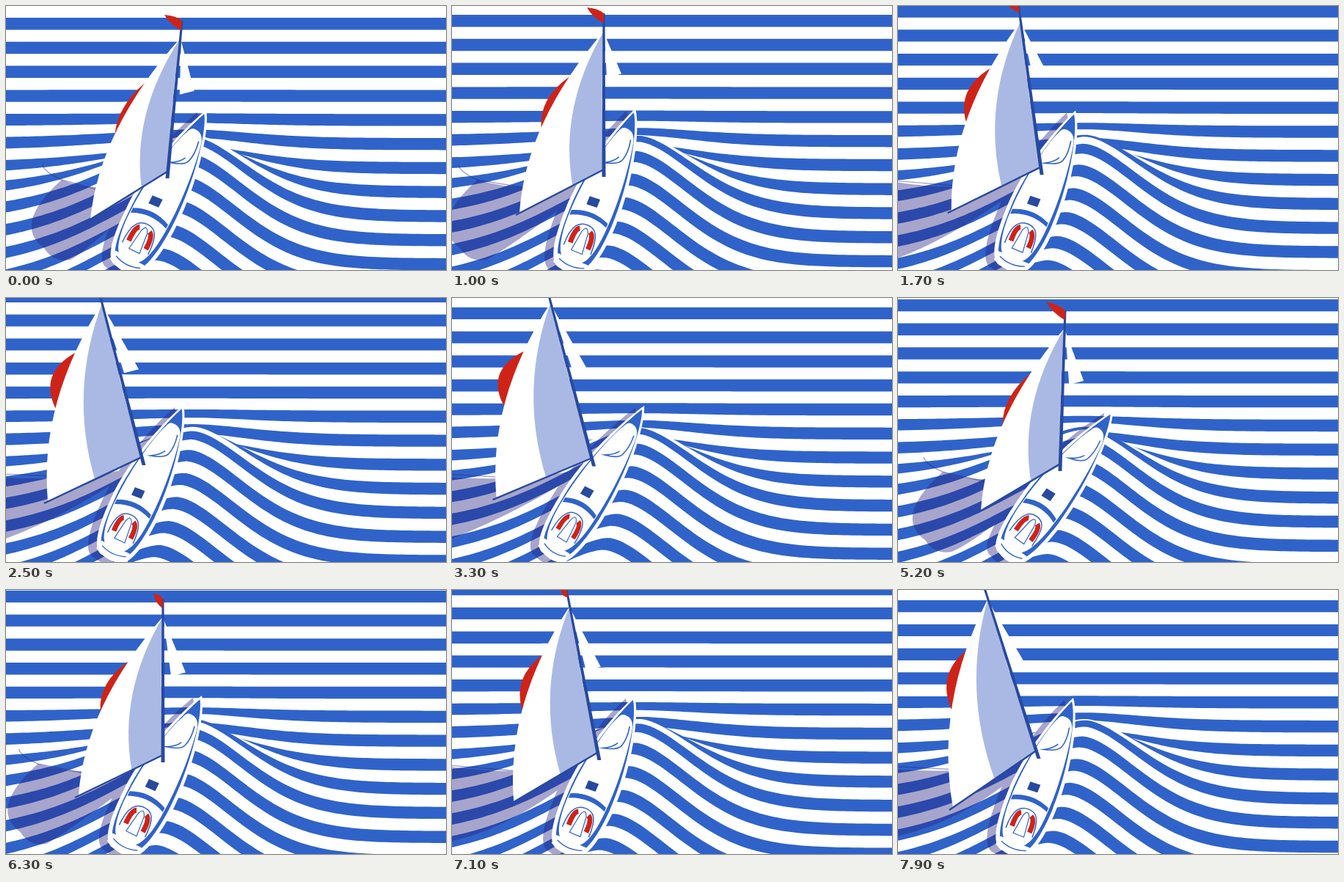
Animation, 600 px wide and 360 px high, one loop 8000 ms. Source, as an HTML page with a canvas:

```html
<!DOCTYPE html>
<html lang="en">
<head>
<meta charset="utf-8">
<title>Sailing over striped waves</title>
<style>
  html, body { margin: 0; width: 100%; height: 100%; overflow: hidden; background: #fff; }
  canvas { display: block; width: 100vw; height: 100vh; }
</style>
</head>
<body>
<canvas id="stage" width="600" height="360"></canvas>
<script>
const ctx = document.getElementById('stage').getContext('2d');
const W = 600, H = 360, LOOP = 8000, STEP = 100;
const BLUE = '#3063c9', NAVY = '#274a9f', RED = '#cf2318', LILAC = '#aab9e4';
const SHADE = 'rgba(36,30,125,0.4)';
const HULL_LENGTH = 242;

// time, bow x y, heading, length, beam, mast foot x y, mast top x y,
// pennant dx dy, clew x y, fold position, red bulge, jib dx dy
const POSES = [
  [0,    273, 142, 26.8, 245, 1,    220, 235, 240, 20,  -24, -8, 115, 291, .66, 6,  19, 72],
  [1000, 250, 140, 22,   240, 1,    207, 233, 207, 10,  -23, -8, 92,  282, .63, 9,  24, 58],
  [2500, 242, 146, 25,   232, .97,  188, 228, 124, -20, -12, 5,  57,  277, .5,  16, 50, 90],
  [4000, 282, 148, 36.5, 253, .9,   203, 232, 150, -15, -15, 0,  73,  271, .56, 17, 48, 93],
  [5200, 293, 154, 35.5, 248, .95,  221, 236, 228, 17,  -26, -12, 113, 290, .63, 7,  26, 72],
  [6300, 267, 144, 26.8, 240, 1,    214, 235, 214, 12,  -13, -7, 99,  280, .63, 9,  31, 76],
  [7900, 239, 147, 21.5, 229, .98,  192, 230, 114, -15, -5,  12, 75,  297, .5,  13, 50, 87]
];

// Smooth interpolation through the poses, at rest at both ends
function slope(i, c) {
  const a = POSES[i - 1], b = POSES[i + 1];
  return a && b ? (b[c] - a[c]) / (b[0] - a[0]) : 0;
}

function poseAt(t) {
  let i = 0;
  while (i < POSES.length - 2 && t > POSES[i + 1][0]) i++;
  const a = POSES[i], b = POSES[i + 1], d = b[0] - a[0], u = (t - a[0]) / d;
  const u2 = u * u, u3 = u2 * u;
  const v = a.map((p, c) =>
    (2 * u3 - 3 * u2 + 1) * p + (u3 - 2 * u2 + u) * d * slope(i, c) +
    (3 * u2 - 2 * u3) * b[c] + (u3 - u2) * d * slope(i + 1, c));
  return {
    bow: [v[1], v[2]], heading: v[3] * Math.PI / 180, len: v[4] / HULL_LENGTH, beam: v[5],
    foot: [v[6], v[7]], top: [v[8], v[9]], pennant: [v[10], v[11]],
    clew: [v[12], v[13]], fold: v[14], bulge: v[15], jib: [v[16], v[17]]
  };
}

const mix = (a, b, u) => [a[0] + (b[0] - a[0]) * u, a[1] + (b[1] - a[1]) * u];
const add = (a, x, y) => [a[0] + x, a[1] + y];
const quad = (a, c, b, u) => mix(mix(a, c, u), mix(c, b, u), u);

function fill(path, color) {
  ctx.fillStyle = color;
  ctx.fill(path);
}

function stroke(path, color, width) {
  ctx.strokeStyle = color;
  ctx.lineWidth = width;
  ctx.stroke(path);
}

// Sea: s is the undisturbed height of a stripe edge
function swell(s) {
  return 112 / (1 + Math.exp((240 - s) / 18)) + 9 * Math.exp(-(((s - 188) / 22) ** 2));
}

function seaY(x, s, height, ridge) {
  const d = x - ridge;
  const fall = d < 0 ? (-d / 160) ** 1.6 : (d / 112) ** 1.7;
  return s - height * Math.exp(-fall);
}

function drawSea(t) {
  const period = 32.8;
  const first = (16 + 28.8 * t / 1000) % period - period;
  ctx.fillStyle = '#fff';
  ctx.fillRect(0, 0, W, H);
  for (let k = 0; k < 36; k++) {
    const s = first + k * period / 2;
    const height = swell(s);
    const ridge = 255 - 30 * (Math.max(0, s - 275) / 130) ** 1.5;
    const p = new Path2D();
    p.moveTo(0, H + 200);
    for (let x = 0; x <= W; x += 6) p.lineTo(x, seaY(x, s, height, ridge));
    p.lineTo(W, H + 200);
    fill(p, k % 2 ? '#fff' : BLUE);
  }
}

const hull = new Path2D('M0 0C-12 25-38 100-37 165C-37 200-33 242-14 242Q0 246 12 242C28 238 34 200 35 165C36 95 16 20 0 0Z');
const deck = new Path2D('M-4 30C8 28 14 36 16 50C24 90 27 140 25 170C24 200 18 222 8 226L-16 226C-26 222-31 190-30 165C-30 120-20 60-10 38Q-8 31-4 30Z');
const cabin = new Path2D('M10 42Q14 60 10 72Q7 80-12 85Q0 78 4 70');
const hatch = new Path2D('M-13 135L2 134L2 146L-13 147Z');
const bridge = new Path2D('M-29 162Q-3 149 24 161L24 167Q-3 156-29 169Z');
const cockpit = new Path2D('M-21 210C-22 180-12 173-1 173C11 173 18 180 18 209');
const seats = new Path2D('M-14 204Q-15 184-9 181M12 204Q13 184 6 181');
const well = new Path2D('M-5 184Q-1 172 4 184L7 213L-9 213Z');
const transom = new Path2D('M-20 230Q-2 238 17 230');

function hullMatrix(p) {
  return new DOMMatrix().translateSelf(...p.bow)
    .rotateSelf(p.heading * 180 / Math.PI).scaleSelf(p.beam, p.len);
}

function drawHull(p) {
  ctx.save();
  ctx.translate(...p.bow);
  ctx.rotate(p.heading);
  ctx.scale(p.beam, p.len);
  fill(hull, '#fff');
  ctx.save();
  ctx.translate(0, 116);
  ctx.scale(.86, .95);
  ctx.translate(0, -116);
  fill(hull, BLUE);
  ctx.restore();
  fill(deck, '#fff');
  const stern = new Path2D('M-24 224L20 224L22 236Q0 250-26 237Z');
  fill(stern, '#fff');
  stroke(cabin, BLUE, 1.6);
  fill(hatch, NAVY);
  fill(bridge, BLUE);
  stroke(cockpit, BLUE, 1.5);
  ctx.lineCap = 'butt';
  stroke(seats, RED, 7);
  fill(well, '#fff');
  stroke(well, BLUE, 1.2);
  stroke(transom, BLUE, 1.4);
  ctx.restore();
}

function drawShadow(p) {
  const x = p.top[0] * 1.25 - 250, y = 219;
  const head = [x + 26, y + 18];
  const s = new Path2D();
  s.moveTo(...head);
  s.quadraticCurveTo(x - 42, 298, x + 2, 330);
  s.quadraticCurveTo(x + 14, 350, x + 38, 346);
  s.quadraticCurveTo(p.clew[0], p.clew[1] + 40, p.foot[0] - 8, p.foot[1] + 2);
  s.quadraticCurveTo(p.clew[0] + 8, 258, ...head);
  s.closePath();
  s.addPath(hull, new DOMMatrix().translateSelf(-12, 3).multiplySelf(hullMatrix(p)));
  fill(s, SHADE);
  const spar = new Path2D();
  spar.moveTo(x, y - 2);
  spar.quadraticCurveTo(x + 3, y + 8, ...head);
  spar.lineTo(p.clew[0] + 8, p.foot[1] + 15);
  stroke(spar, SHADE, 1.4);
}

function drawRig(p) {
  const head = mix(p.top, p.foot, .11);
  const tack = mix(p.top, p.foot, .955);
  const leech = add(mix(head, p.clew, .5), -49, 0);
  const hem = mix(p.clew, tack, p.fold);
  const foldCtrl = add(mix(head, hem, .5), -40, 0);
  const luff = add(mix(head, tack, .5), -5, 0);

  const jib = new Path2D();
  const jibClew = add(head, ...p.jib);
  jib.moveTo(head[0] + 1, head[1] + 4);
  jib.lineTo(...jibClew);
  jib.lineTo(jibClew[0] - 20, jibClew[1] + 5);
  fill(jib, '#fff');

  const redTop = quad(head, leech, p.clew, .25);
  const redEnd = quad(head, leech, p.clew, .53);
  const red = new Path2D();
  red.moveTo(...redTop);
  red.quadraticCurveTo(...add(mix(redTop, redEnd, .5), -2 * p.bulge - 4, -.6 * p.bulge), ...redEnd);
  red.lineTo(redEnd[0] + 5, redEnd[1]);
  red.lineTo(redTop[0] + 5, redTop[1]);
  fill(red, RED);

  const sail = new Path2D();
  sail.moveTo(...head);
  sail.quadraticCurveTo(...leech, ...p.clew);
  sail.lineTo(...tack);
  sail.quadraticCurveTo(...luff, ...head);
  fill(sail, '#fff');

  const lee = new Path2D();
  lee.moveTo(...head);
  lee.quadraticCurveTo(...foldCtrl, ...hem);
  lee.lineTo(...tack);
  lee.quadraticCurveTo(...luff, ...head);
  fill(lee, LILAC);

  const boom = new Path2D();
  boom.moveTo(p.clew[0] - 5, p.clew[1] + 3);
  boom.lineTo(...tack);
  stroke(boom, NAVY, 2.4);

  const mast = new Path2D();
  mast.moveTo(p.top[0] - 1.5, p.top[1]);
  mast.lineTo(p.top[0] + 1.5, p.top[1]);
  mast.lineTo(p.foot[0] + 2.5, p.foot[1]);
  mast.lineTo(p.foot[0] - 2.5, p.foot[1]);
  fill(mast, NAVY);

  const tip = add(p.top, ...p.pennant);
  const hoist = mix(p.top, p.foot, .06);
  const pennant = new Path2D();
  pennant.moveTo(...p.top);
  pennant.quadraticCurveTo(...add(mix(p.top, tip, .5), 3, -3), ...tip);
  pennant.quadraticCurveTo(...add(mix(hoist, tip, .5), -4, 3), ...hoist);
  fill(pennant, RED);
}

function draw(t) {
  const p = poseAt(t);
  drawSea(t);
  drawShadow(p);
  drawHull(p);
  drawRig(p);
}

const start = performance.now();
let shown = -1;

function tick() {
  const elapsed = Math.max(0, performance.now() - start) % LOOP;
  const t = Math.floor(elapsed / STEP) * STEP;
  if (t !== shown) draw(shown = t);
  requestAnimationFrame(tick);
}
tick();
</script>
</body>
</html>
```
